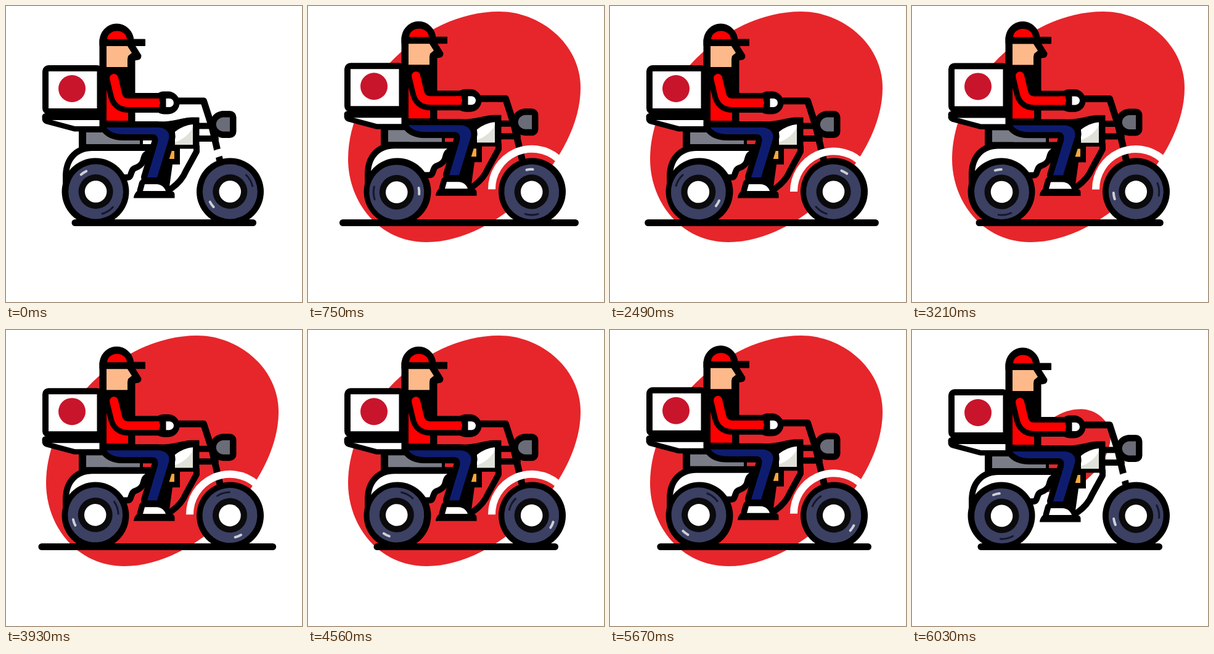
An HTML page that plays this animation: 480x480 px, repeating every 6.06 s.

```html
<!DOCTYPE html>
<html lang="en">
<head>
<meta charset="utf-8">
<title>Delivery rider</title>
<style>
  html, body { margin: 0; width: 100%; height: 100%; overflow: hidden; background: #fff; }
  svg { display: block; width: 100%; height: 100%; }
  .line { fill: none; stroke: #000; stroke-linejoin: round; stroke-linecap: round; }
  .edge { stroke: #000; stroke-linejoin: round; paint-order: stroke; }
</style>
</head>
<body>
<svg viewBox="0 0 480 480">
  <defs>
    <g id="tyre">
      <circle r="44.5" fill="#3c4063"/>
      <circle r="28" fill="#0b0b0d"/>
      <circle r="17.8" fill="#fff"/>
    </g>
  </defs>

  <path id="blob" fill="#e6262b" d="M310 9C375 9 442 60 442 133C442 245 310 383 192 383C115 383 65 318 65 248C65 130 185 9 310 9Z"/>
  <line id="ground" class="line" y1="351.5" y2="351.5" stroke-width="11"/>

  <g id="body">
    <!-- rear bodywork and seat -->
    <path class="edge" fill="#fff" stroke-width="20" d="M102 274C103 250 117 235 140 235H226C219 239 219 246 217 251C214 257 208 257 204 260C200 263 199 268 197 273Z"/>
    <path d="M92 272H112V305H92Z"/>
    <path d="M118 198H222V224H250V234H118Z"/>
    <path fill="#7a7d87" d="M130 205H217V224H130Z"/>

    <!-- engine, tank and frame -->
    <path d="M246 226H282V257H270L264 300H236Z"/>
    <path fill="#f9a83c" d="M262 235H273V248H260Z"/>
    <path class="line" stroke-width="10" d="M309 228V236L292 267Q285 284 268 296"/>
    <path class="line" stroke-width="10" d="M310 194.500H330M310 215H340"/>
    <path class="edge" stroke-width="1" d="M250 188C272 188 284 182 300 181H313V231H262Z"/>
    <path fill="#fff" d="M274 225V204C283 197 292 193 303 192V225Z"/>
    <path fill="#e0e1d9" d="M274 225V221C288 216 297 208 303 197V225Z"/>

    <!-- steering and lamp -->
    <path class="line" stroke-width="11" d="M278 154H320.500L334 196L348 256"/>
    <path class="edge" fill="#6a6d78" stroke-width="21" d="M363 180.500V203.500H352C337 201.500 337 182.500 352 180.500Z"/>
    <path fill="none" stroke="#fff" stroke-width="12" d="M298 301A65 65 0 0 1 405 251"/>

    <!-- box and tray -->
    <path class="edge" fill="#fff" stroke-width="20" d="M69 106H147.500V166H69Z"/>
    <path d="M66 170H158V186H66Z"/>
    <path class="edge" fill="#fff" stroke-width="17" d="M67 183H152V195H112Z"/>
    <path class="line" stroke-width="11" d="M64 179.500H152"/>
    <circle cx="107" cy="134" r="22" fill="#c8152c"/>

    <!-- head -->
    <path class="edge" stroke-width="1" d="M152 202V58A27.500 28 0 0 1 207 56L209 64L219 80Q219 87 214 87L209 88V202Z"/>
    <path class="edge" stroke-width="1" d="M152 54H225.500V64.500H152Z"/>
    <path fill="#f00" d="M164 54C165 36 195 36 196 54Z"/>
    <path fill="#fdb98a" d="M163 65H197L204 76L198 81L197 86V99H163Z"/>

    <!-- leg and shoe -->
    <path class="edge" fill="#0e1c70" stroke-width="20" d="M163 197H246C259 197 267 205 264 216L245 278H229L246 222C248 213 244 208 238 208H190C177 208 168 204 163 197Z"/>
    <path class="edge" fill="#fff" stroke-width="19" d="M222 300L225 289H244C252 289 257 294 259 300Z"/>
    <path d="M212 300.500H269Q273.500 301 273.500 306V311.500H207Q207 306 212 300.500Z"/>
    <path fill="#7a7d87" d="M165 218H217V224H165Z"/>

    <!-- torso and arm -->
    <path fill="#f00" d="M163 112H185V160H198V186H163Z"/>
    <path class="line" stroke-width="32" d="M175 117L181 142Q184 157 198 157H250"/>
    <path class="line" stroke-width="37" d="M256 157H263"/>
    <path class="line" style="stroke:#f00" stroke-width="14" d="M175 117L181 142Q184 157 198 157H243"/>
    <path fill="#f00" d="M240 150H249V164H240Z"/>
    <path fill="#fff" d="M259.500 150H265A7 7 0 0 1 265 164H259.500Z"/>
  </g>

  <g id="wheels"></g>
</svg>
<script>
const LOOP = 6060, HALF = LOOP / 2, STEP = 30;
const $ = id => document.getElementById(id);

// angles are of the light and the dark streak at rest
const wheels = [
  { x: 145, y: 301, off: 1.2, light: 237, dark: 58 },
  { x: 363.5, y: 301, off: 0.4, light: 145, dark: -30 }
];

function arc(r, mid, span, color, width) {
  const at = deg => {
    const a = deg * Math.PI / 180;
    return `${r * Math.cos(a)} ${r * Math.sin(a)}`;
  };
  return `<path fill="none" stroke="${color}" stroke-width="${width}" stroke-linecap="round"
    d="M${at(mid - span / 2)}A${r} ${r} 0 0 1 ${at(mid + span / 2)}"/>`;
}

$("wheels").innerHTML = wheels.map(w => `
  <g transform="translate(${w.x} ${w.y})">
    <circle r="54.5"/>
    <g class="spin" data-x="${w.off}">
      <use href="#tyre"/>
      ${arc(36.5, w.light, 16, "#cfd0d3", 4)}
      ${arc(37.5, w.dark, 32, "#15172a", 3)}
    </g>
  </g>`).join("");
const spins = [...document.querySelectorAll(".spin")];

const cubic = p => p < 0.5 ? 4 * p ** 3 : 1 - 4 * (1 - p) ** 3;

// 0 to 1 and back over one period
function swing(t, period) {
  const p = (t % period) / period;
  return cubic(p < 0.5 ? 2 * p : 2 - 2 * p);
}

function backOut(p) {
  const s = 1.9, q = 1 - Math.min(p, 1);
  return 1 - q * q * ((s + 1) * q - s);
}

function draw(time) {
  const t = Math.floor((time % LOOP) / STEP) * STEP;
  const m = t <= HALF ? t : LOOP - t; // plays forward, then backward

  const size = m ? backOut((m + 3) / 396) : 0;
  $("blob").setAttribute("transform", `translate(253.5 196) scale(${size}) translate(-253.5 -196)`);

  const reach = swing(m, 1515);
  $("ground").setAttribute("x1", 112 - 55.5 * reach);
  $("ground").setAttribute("x2", 400.5 + 33 * reach);

  $("body").setAttribute("transform", `translate(0 ${-4 * swing(m, 1212)})`);

  for (const s of spins)
    s.setAttribute("transform", `translate(-0.6 0) rotate(${0.64 * m}) translate(${s.dataset.x} 0)`);
}

const start = performance.now();
function tick() {
  draw(performance.now() - start);
  requestAnimationFrame(tick);
}
tick();
</script>
</body>
</html>
```
